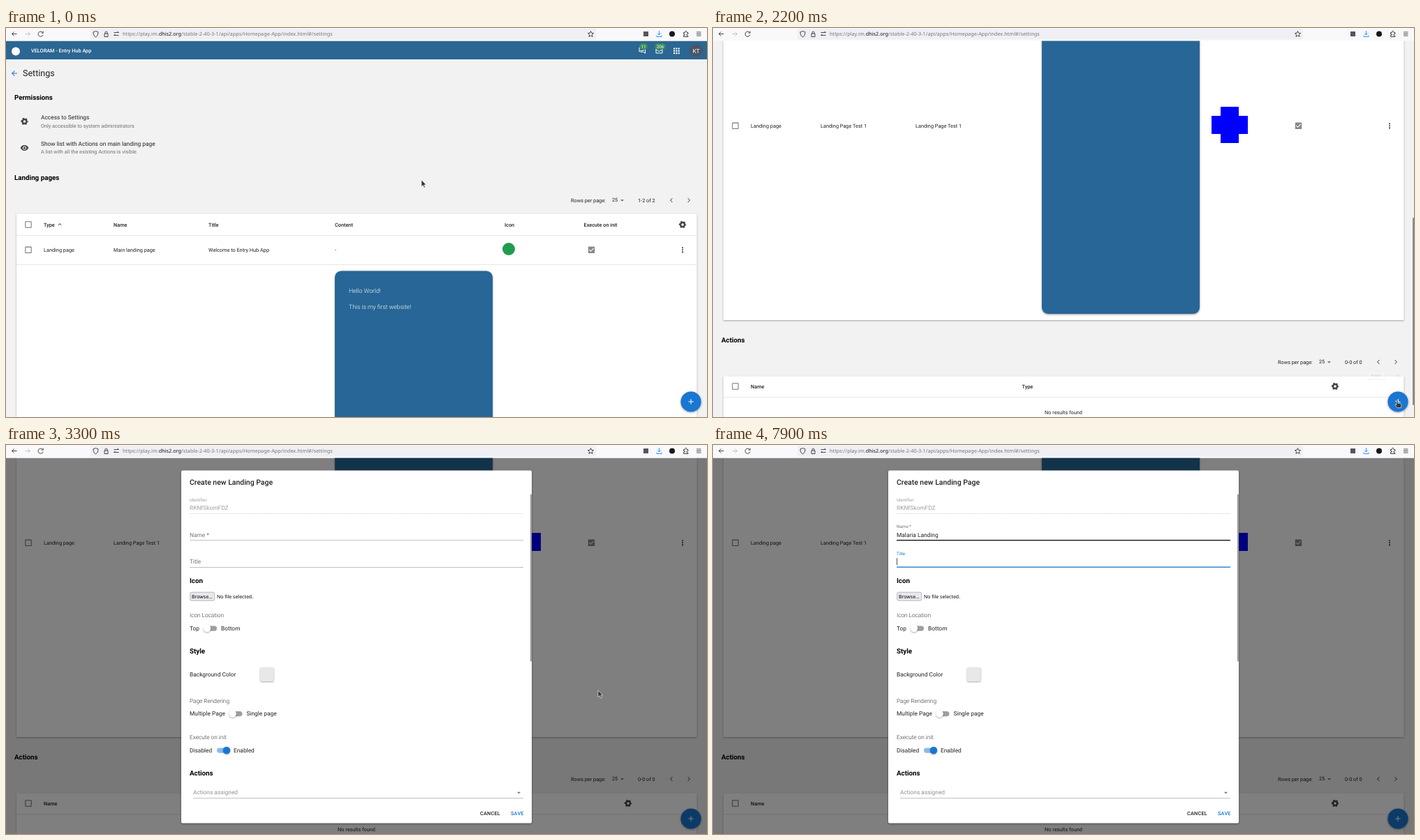
These frames come from a looping animation (1004 by 558 pixels, 8000 ms). An HTML page:

```html
<!DOCTYPE html>
<html lang="en">
<head>
<meta charset="utf-8">
<title>Settings</title>
<style>
html, body { margin: 0; width: 100%; height: 100%; overflow: hidden; background: #f2f2f2; }
svg { display: block; width: 1004px; height: 558px; font-family: Roboto, sans-serif; text-rendering: geometricPrecision; }
text { white-space: pre; }
.ui { font-family: "Noto Sans", sans-serif; }
.line { fill: none; stroke-width: .9; }
.paper { filter: drop-shadow(0 1px 1px #0005); }
.raised { filter: drop-shadow(0 1.5px 1.5px #0006); }
</style>
</head>
<body>
<svg id="stage" viewBox="0 0 1004 558"></svg>
<script>
const LOOP = 8000, STEP = 100, MAX_SCROLL = 478;
const INK = '#000000de', GREY = '#0000008a', BLUE = '#1976d2', BRAND = '#276696';
const SMALL = 7.32, BODY = 8.37, HEAD = 9.79;

const PATHS = {
  back: 'M20 11H7.83l5.59-5.59L12 4l-8 8 8 8 1.41-1.41L7.83 13H20v-2z',
  eye: 'M12 4.5C7 4.5 2.73 7.61 1 12c1.73 4.39 6 7.5 11 7.5s9.27-3.11 11-7.5c-1.73-4.39-6-7.5-11-7.5zM12 17c-2.76 0-5-2.24-5-5s2.24-5 5-5 5 2.24 5 5-2.24 5-5 5zm0-8a3 3 0 1 0 0 6 3 3 0 0 0 0-6z',
  box: 'M19 5v14H5V5h14m0-2H5c-1.1 0-2 .9-2 2v14c0 1.1.9 2 2 2h14c1.1 0 2-.9 2-2V5c0-1.1-.9-2-2-2z',
  checked: 'M19 3H5c-1.1 0-2 .9-2 2v14c0 1.1.9 2 2 2h14c1.1 0 2-.9 2-2V5c0-1.1-.9-2-2-2zm-9 14l-5-5 1.41-1.41L10 14.17l7.59-7.59L19 8l-9 9z',
  prev: 'M15.41 7.41L14 6l-6 6 6 6 1.41-1.41L10.83 12z',
  next: 'M10 6L8.59 7.41 13.17 12l-4.58 4.59L10 18l6-6z',
  up: 'M12 8l-6 6 1.41 1.41L12 10.83l4.59 4.58L18 14z',
  down: 'M7 10l5 5 5-5z',
  plus: 'M19 13h-6v6h-2v-6H5v-2h6V5h2v6h6v2z',
  page: 'M20 19.59V8l-6-6H6c-1.1 0-2 .9-2 2v16c0 1.1.9 2 2 2h12c.45 0 .85-.15 1.19-.4l-4.43-4.43A5 5 0 1 1 16.17 15.75L20 19.59zM9 13a3 3 0 1 0 6 0 3 3 0 0 0-6 0z',
  open: 'M19 4H5c-1.1 0-2 .9-2 2v12c0 1.1.9 2 2 2h4v-2H5V8h14v10h-4v2h4c1.1 0 2-.9 2-2V6c0-1.1-.9-2-2-2zm-7 6l-4 4h3v6h2v-6h3l-4-4z',
  chat: 'M4 4h12v9H7l-3 3zM19 8h2v13l-4-4H8v-2',
  mail: 'M3 5h18v14H3zM3 9l9 5 9-5'
};
const POINTERS = {
  arrow: '<path d="M0 0V9.5l2.2-2 1.6 3.6 1.6-.7-1.6-3.5h3z" fill="#333" stroke="#fff" stroke-width=".6"/>',
  hand: '<path d="M-1 .6a1 1 0 0 1 2 0v3.6l4 1c.8.2 1.1.7 1 1.5l-.6 4H0L-3 7c-.4-.6.4-1.4 1-.9l1 .8z" fill="#333" stroke="#fff" stroke-width=".6"/>',
  text: '<path d="M-1.5-4.5h3M0-4.5v9M-1.5 4.5h3" stroke="#222" stroke-width=".9"/>',
  none: ''
};

// Text is placed by its left edge and the middle of its capitals.
const text = (x, y, s, size = SMALL, fill = INK, extra = '') =>
  `<text x="${x}" y="${y + .355 * size}" font-size="${size}" fill="${fill}" ${extra}>${s}</text>`;
const bold = (x, y, s) => text(x, y, s, HEAD, '#000', 'font-weight="700"');
const medium = (x, y, s, fill = INK) => text(x, y, s, SMALL, fill, 'font-weight="500"');
const rect = (x, y, w, h, fill, extra = '') =>
  `<rect x="${x}" y="${y}" width="${w}" height="${h}" fill="${fill}" ${extra}/>`;
const circle = (x, y, r, fill, extra = '') => `<circle cx="${x}" cy="${y}" r="${r}" fill="${fill}" ${extra}/>`;
const icon = (name, x, y, fill = GREY, scale = .523) =>
  `<path transform="translate(${x} ${y}) scale(${scale}) translate(-12 -12)" d="${PATHS[name]}" fill="${fill}"/>`;
const outline = (name, x, y) =>
  `<path transform="translate(${x} ${y}) scale(.5) translate(-12 -12)" d="${PATHS[name]}" fill="none" stroke="#fff" stroke-width="2"/>`;
const stroke = (d, color = '#333') => `<path class="line" d="${d}" stroke="${color}"/>`;
const gear = (x, y) => `<g fill="none" stroke="#444" transform="translate(${x} ${y})">` +
  `<circle r="3" stroke-width="2.4"/><circle r="4.4" stroke-width="1.6" stroke-dasharray="2.3 2.308" stroke-dashoffset="1.15"/></g>`;
const dots = (x, y) => [-3.1, 0, 3.1].map(d => circle(x, y + d, 1.05, '#333')).join('');

function browserBar() {
  return rect(0, 0, 1004, 18.5, '#f9f9fb') + rect(121, 1, 724, 15.5, '#f0f0f4', 'rx="2"') +
    stroke('M15.5 8.5h-7M11.5 5.5l-3 3 3 3') + stroke('M27.5 8.5h7M31.5 5.5l3 3-3 3', '#bbb') +
    stroke('M52.6 6.6a3.6 3.6 0 1 0 .5 3M53.2 4.5v2.6h-2.6') +
    stroke('M128.5 4.5l-3.5 1.3c0 3.5 1 5.7 3.5 7.2 2.500-1.500 3.500-3.700 3.500-7.200z') +
    stroke('M141 8h5v4.500h-5zM142 8v-1.500a1.500 1.500 0 0 1 3 0v1.500') +
    stroke('M154.500 6.500h7M159.500 5l2 1.500M161.500 10.500h-7M156.500 9l-2 1.500') +
    `<text class="ui" x="167" y="10.900" font-size="7.300" fill="#76767c">https://play.im.<tspan fill="#15141a">dhis2.org</tspan>/stable-2-40-3-1/api/apps/Homepage-App/index.html#/settings</text>` +
    stroke('M837.500 4.500l1.200 2.700 2.900.3-2.200 2 .7 2.900-2.600-1.500-2.600 1.500.7-2.900-2.200-2 2.900-.3z') +
    rect(913, 5, 7, 7, '#55555c') +
    stroke('M935.500 4v6M933 7.500l2.500 2.500 2.500-2.500M932 10.500v2h7v-2', '#1a8cff') +
    circle(954, 8.500, 4, '#17171c') +
    stroke('M970.500 6.500h2v-1a1.200 1.200 0 0 1 2.400 0v1h2v2.200h-1a1.200 1.200 0 0 0 0 2.400h1v1.400h-6.400v-2h1.500v-2h-1.500z') +
    stroke('M989 6h6.500M989 8.500h6.500M989 11h6.500');
}

function appHeader() {
  const apps = [0, 1, 2].flatMap(i => [0, 1, 2].map(j => rect(956 + i * 3.3, 28.5 + j * 3.3, 2.1, 2.1, '#fff'))).join('');
  const badge = (x, w, n) => rect(x - w / 2, 22, w, 9, '#388e5a', 'rx="4.5"') +
    text(x, 26.5, n, 6.3, '#fff', 'text-anchor="middle"');
  return rect(0, 18.5, 1004, 26.5, '#2c6693') + circle(14, 33.5, 6, '#fff') +
    medium(36, 32, 'VELORAM - Entry Hub App', '#fff') +
    outline('chat', 911, 32) + outline('mail', 935.5, 32.5) + badge(913, 12, '11') + badge(937, 16, '206') + apps +
    circle(988.5, 32.5, 9.3, '#4a5568') + text(988.5, 32.7, 'KT', BODY, '#fff', 'text-anchor="middle"');
}

const pager = (y, range) => text(809, y, 'Rows per page:') + text(868, y - .3, '25') + icon('down', 882.5, y + .3) +
  text(905, y, range) + icon('prev', 953, y) + icon('next', 978, y);

const row = (y, name, title, content) => icon('box', 32, y) + text(54, y, 'Landing page') + text(154, y, name) +
  text(290, y, title) + text(471, y, content) + icon('checked', 838.5, y, '#888') + dots(969, y);

function page() {
  return appHeader() + icon('back', 12, 65, BLUE, .5) + text(24, 65, 'Settings', 12.55) +
    bold(12, 99.5, 'Permissions') +
    gear(26.5, 134) + text(50, 128.5, 'Access to Settings', BODY) + text(50, 140, 'Only accessible to system administrators', SMALL, GREY) +
    icon('eye', 26.5, 172, '#444') + text(50, 166.5, 'Show list with Actions on main landing page', BODY) +
    text(50, 177.8, 'A list with all the existing Actions is visible', SMALL, GREY) +
    bold(12, 215, 'Landing pages') + pager(247, '1-2 of 2') +
    rect(15, 266.5, 974.5, 630.5, '#fff', 'class="paper" rx="1"') +
    icon('box', 32, 282) + medium(54, 282, 'Type') + icon('up', 77, 281.8, '#444', .42) +
    medium(154, 282, 'Name') + medium(290, 282, 'Title') + medium(471, 282, 'Content') + medium(714, 282, 'Icon') +
    medium(827.5, 282, 'Execute on init') + gear(969, 282) +
    rect(15, 297, 974.5, .7, '#ddd') + rect(15, 339, 974.5, .7, '#ddd') +
    row(318.3, 'Main landing page', 'Welcome to Entry Hub App', '-') + circle(720, 317, 9, '#1f9d4d') +
    row(618.3, 'Landing Page Test 1', 'Landing Page Test 1', '') +
    rect(471, 348.5, 226, 539.5, BRAND, 'rx="9" class="raised"') +
    text(491, 376.5, 'Hello World!', 8.7, '#fff', 'font-weight="300"') +
    text(491, 400, 'This is my first website!', 8.7, '#fff', 'font-weight="300"') +
    '<path d="M727 591h26v13h13v26h-13v13h-26v-13h-13v-26h13z" fill="#00f"/>' +
    bold(12, 925.5, 'Actions') + pager(957, '0-0 of 0') +
    rect(15, 977.5, 974.5, 80, '#fff', 'class="paper" rx="1"') +
    icon('box', 32, 992) + medium(54, 992, 'Name') + medium(442.5, 992, 'Type') + gear(891, 992) +
    rect(15, 1007.5, 974.5, .7, '#ddd') +
    text(502, 1029, 'No results found', SMALL, INK, 'text-anchor="middle"');
}

const dialAction = (id, y, name, label) =>
  `<g id="${id}Label">${label}</g><g id="${id}Button">${circle(981, y, 10.4, '#fff', `id="${id}Disc" class="raised"`)}${icon(name, 981, y, '#444')}</g>`;

function speedDial() {
  const tip = (x, y, w, h, lines) => rect(x, y, w, h, '#fff', 'rx="2" class="paper"') + lines;
  return dialAction('land', 470, 'page', tip(916, 454.5, 46.5, 29, text(924, 463, 'Landing', BODY, GREY) + text(924, 475.5, 'Page', BODY, GREY))) +
    dialAction('act', 498.5, 'open', tip(922, 490, 40.5, 17, text(930, 498.5, 'Action', BODY, GREY))) +
    circle(981, 536, 14.6, BLUE, 'class="raised"') + `<g id="fabIcon">${icon('plus', 981, 536, '#fff')}</g>`;
}

const field = (id, y, label) => `<text id="${id}Label" font-size="${BODY}">${label}</text>` +
  rect(263, y + 7.5, 478, .6, '#0000006b') + rect(263, y + 7, 478, 1.2, '#000', `id="${id}Hover"`) +
  rect(263, y + 7, 478, 1.2, BLUE, `id="${id}Focus"`) + text(263, y, '', BODY, INK, `id="${id}Value"`);

function toggle(y, left, right, trackX, thumbX, rightX, on) {
  return text(263, y, left, BODY) + rect(trackX, y - 3.6, 17.5, 7.3, on ? BLUE : '#000', `rx="3.6" opacity="${on ? .5 : .38}"`) +
    circle(thumbX, y, 5.2, on ? BLUE : '#fff', 'class="paper"') + text(rightX, y, right, BODY);
}

function dialog() {
  const section = (y, s) => text(263, y, s, 8.25, '#333', 'font-weight="300"');
  return rect(251, 36.5, 502, 506, '#fff', 'rx="2" class="raised"') +
    text(263, 53, 'Create new Landing Page', 10.46, INK, 'font-weight="500"') +
    text(263, 78.5, 'Identifier', 6.28, '#00000061') + text(263, 90.5, 'RKNfSkomFDZ', BODY, '#00000061') +
    '<path d="M263 98.500h478" stroke="#0006" stroke-width=".6" stroke-dasharray=".6 1"/>' +
    field('name', 129, 'Name *') + field('title', 167.5, 'Title') + rect(0, 0, .7, 10, '#000', 'id="caret"') +
    bold(263, 195, 'Icon') + rect(263.7, 211.200, 35, 12, '#e9e9ed', 'rx="2" stroke="#8f8f9d" stroke-width=".6"') +
    text(266, 217.5, 'Browse...', 6.97, '#000', 'class="ui"') + text(302, 217.5, 'No file selected.', 6.97, '#000', 'class="ui"') +
    section(244.5, 'Icon Location') + toggle(263, 'Top', 'Bottom', 284.5, 288, 308) +
    bold(263, 295.5, 'Style') + text(263, 329, 'Background Color', BODY) +
    rect(364, 319, 19.500, 20, '#e8e8ea', 'rx="2" class="paper"') +
    section(367, 'Page Rendering') + toggle(385.5, 'Multiple Page', 'Single page', 321, 324.500, 344.500) +
    section(419.5, 'Execute on init') + toggle(438, 'Disabled', 'Enabled', 302, 316, 326, true) +
    bold(263, 470.5, 'Actions') + text(268, 498.5, 'Actions assigned', BODY, '#00000070') +
    icon('down', 734.5, 498.800) + rect(268, 506.5, 473, .6, '#0000006b') +
    text(679, 528, 'CANCEL', SMALL, INK, 'font-weight="500" letter-spacing=".2"') +
    text(723, 528, 'SAVE', SMALL, BLUE, 'font-weight="500" letter-spacing=".2"') +
    rect(751, 70.5, 1.700, 240, '#8a8a8e', 'rx=".8"');
}

document.getElementById('stage').innerHTML = rect(0, 0, 1004, 558, '#f2f2f2') +
  `<g id="page">${page()}</g>` + rect(1002, 0, 2, 269, '#8a8a8e', 'id="thumb" rx="1"') + speedDial() +
  rect(0, 18.5, 1004, 540, '#000', 'id="shade"') + `<g id="dialog">${dialog()}</g>` + browserBar() + '<g id="pointer"></g>';

const el = {};
document.querySelectorAll('[id]').forEach(node => el[node.id] = node);
const set = (id, attrs) => Object.entries(attrs).forEach(([key, value]) => el[id].setAttribute(key, value));

const clamp = x => Math.min(1, Math.max(0, x));
const span = (t, a, b) => clamp((t - a) / (b - a));
const ease = (t, a, b) => { const x = span(t, a, b); return x * x * (3 - 2 * x); };
const grow = (x, y, s) => `translate(${x} ${y}) scale(${s}) translate(${-x} ${-y})`;

// time, x, y of the pointer tip
const ROUTE = [[700, 595, 218], [1100, 856, 460], [1200, 856, 460], [1300, 894, 485], [2100, 980, 534], [2300, 980, 534],
  [2600, 979, 471], [3100, 979, 471], [3200, 977, 467], [3300, 848, 352], [3500, 812, 331], [3600, 812, 331],
  [4000, 486, 151], [4100, 486, 151], [4400, 456, 128]];
// a caret step for every character of the name
const NAME = 'Malaria Landing';
const KEYS = [5000, 5200, 5400, 5500, 5700, 5900, 6000, 6000, 6400, 6600, 6800, 6900, 7100, 7300, 7600];

function pointerAt(t) {
  const i = ROUTE.findIndex(k => k[0] > t);
  if (i === 0) return ROUTE[0].slice(1);
  if (i < 0) return ROUTE.at(-1).slice(1);
  const [a, b] = [ROUTE[i - 1], ROUTE[i]], p = span(t, a[0], b[0]);
  return [1, 2].map(k => a[k] + (b[k] - a[k]) * p);
}

function pointerKind(t) {
  if (t >= KEYS[0]) return 'none';
  if (t >= 4200) return 'text';
  return t === 1300 || (t >= 1900 && t < 3200) ? 'hand' : 'arrow';
}

function drawDialAction(id, y, p) {
  set(id + 'Label', { transform: grow(962.5, y, .5 + .5 * p), opacity: p });
  set(id + 'Button', { transform: grow(981, y, p), opacity: p });
}

function drawField(id, y, t, focusAt, blurAt, hovered) {
  const p = ease(t, focusAt - 100, focusAt + 200), focused = t >= focusAt && t < blurAt;
  set(id + 'Label', {
    transform: `translate(263 ${y + .355 * BODY - 12.7 * p}) scale(${1 - .25 * p})`,
    fill: focused ? BLUE : GREY
  });
  set(id + 'Focus', { transform: grow(502, y, `${p} 1`), opacity: +focused });
  set(id + 'Hover', { opacity: +hovered });
}

function draw(t) {
  const scroll = MAX_SCROLL * ease(t, 400, 1000);
  set('page', { transform: `translate(0 ${-scroll})` });
  set('thumb', { y: 19 + scroll * 253 / MAX_SCROLL, opacity: +(scroll > 0 && t < 3200) });

  drawDialAction('act', 498.5, ease(t, 2100, 2400) * (1 - ease(t, 3160, 3300)));
  drawDialAction('land', 470, ease(t, 2200, 2600) * (1 - ease(t, 3100, 3300)));
  set('landDisc', { fill: t < 2500 ? '#fff' : t < 2900 ? '#d8d8d8' : '#c8c8c8' });
  set('fabIcon', { transform: `rotate(${45 * ease(t, 2100, 2400) * (1 - ease(t, 3100, 3300))} 981 536)` });

  const shown = 1 - (1 - span(t, 3100, 3300)) ** 1.75;
  set('shade', { opacity: .5 * shown });
  set('dialog', { opacity: shown });

  drawField('name', 129, t, 4500, 7700, t >= 4300);
  drawField('title', 167.5, t, 7700, LOOP, false);
  el.nameValue.textContent = NAME.slice(0, KEYS.filter(k => k <= t).length);
  const inTitle = t >= 7700;
  set('caret', {
    x: 263.3 + (inTitle ? 0 : el.nameValue.getComputedTextLength()),
    y: inTitle ? 162.2 : 123.7,
    opacity: +(t >= 4500)
  });

  el.pointer.innerHTML = POINTERS[pointerKind(t)];
  set('pointer', { transform: `translate(${pointerAt(t)})` });
}

function tick() {
  const t = performance.now() % LOOP;
  draw(Math.floor(t / STEP) * STEP);
  requestAnimationFrame(tick);
}
tick();
</script>
</body>
</html>
```
